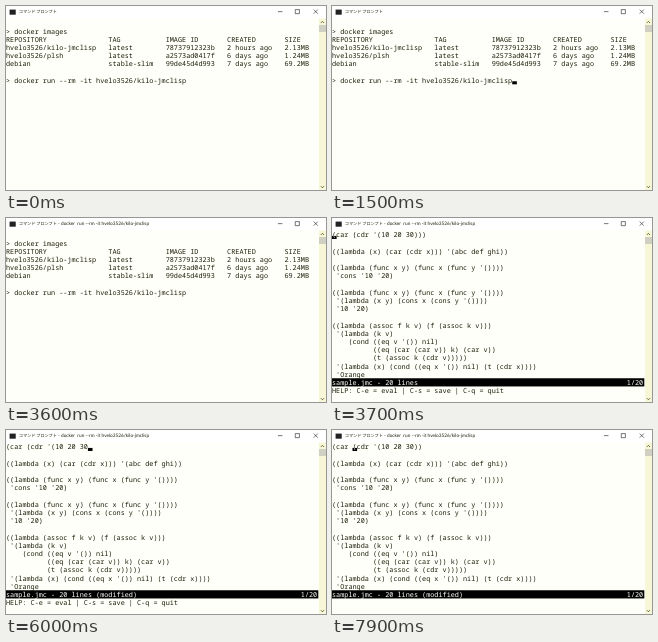
An HTML page for the animation above (8 s loop, 320 by 184 pixels).

```html
<!DOCTYPE html>
<html lang="ja">
<head>
<meta charset="utf-8">
<title>Console</title>
<style>
  :root { --paper: #fffffa; --ink: #1c1c08; }
  html, body { margin: 0; width: 100%; height: 100%; overflow: hidden; background: var(--paper); }
  /* Laid out at 625px wide with 8x16 cells, scaled to 320px. */
  #window {
    position: absolute; left: 0; top: 0; width: 625px; height: 360px; overflow: hidden;
    background: var(--paper); color: var(--ink);
    transform: scale(.512); transform-origin: 0 0;
    text-rendering: geometricPrecision;
  }
  #window > * { position: absolute; }
  #bar { left: 0; top: 0; width: 625px; height: 24px; background: #fff; }
  #icon { left: 7px; top: 7px; width: 12px; height: 10px; background: #222; }
  #title { left: 25px; top: 2px; white-space: pre; font: 9.2px/18px Lato, sans-serif; }
  #title b { font: 8.1px/18px "Noto Sans CJK JP", "Noto Sans CJK", sans-serif; }
  #buttons { left: 530px; top: 5px; fill: none; stroke: #222; stroke-width: 1.2; }
  #text {
    left: 0; top: 25.2px; width: 610px;
    font: 13.333px/16px "Noto Sans Mono", "DejaVu Sans Mono", monospace;
    font-variant-ligatures: none;
  }
  #text div { height: 16px; white-space: pre; }
  #text .status { background: #000; color: var(--paper); }
  #cursor { left: 0; top: 25.2px; width: 9px; height: 6px; background: var(--paper); mix-blend-mode: difference; }
  #scroll { left: 611px; top: 24px; fill: none; stroke: #55552a; stroke-width: 1.8; }
</style>
</head>
<body>
<div id="window">
  <div id="bar"></div>
  <div id="icon"></div>
  <div id="title"><b>コマンド プロンプト</b><span id="command"></span></div>
  <svg id="buttons" width="92" height="14">
    <path d="M1 6h9M35 2h8v8h-8zM71 2l8 8m0-8l-8 8"/>
  </svg>
  <div id="text"></div>
  <div id="cursor"></div>
  <svg id="scroll" width="14" height="336">
    <path d="M0 0h14v336h-14z" fill="#f7f7d8" stroke="none"/>
    <path d="M0 13h14v14h-14z" fill="#cfcfc2" stroke="none"/>
    <path d="M4 9l3-3 3 3M4 328l3 3 3-3"/>
  </svg>
</div>
<script>
const LOOP = 8000;
const $ = id => document.getElementById(id);
const user = 'hvelo3526';
const run = `run --rm -it ${user}/kilo-jmclisp`;

const row = (repo, tag, id, age, size) =>
  repo.padEnd(25) + tag.padEnd(14) + id.padEnd(15) + age.padEnd(14) + size;

const shell = [
  '',
  '> docker images',
  row('REPOSITORY', 'TAG', 'IMAGE ID', 'CREATED', 'SIZE'),
  row(`${user}/kilo-jmclisp`, 'latest', '78737912323b', '2 hours ago', '2.13MB'),
  row(`${user}/plsh`, 'latest', 'a2573ad0417f', '6 days ago', '1.24MB'),
  row('debian', 'stable-slim', '99de45d4d993', '7 days ago', '69.2MB'),
  '',
  `> docker ${run}`
];

const firstLine = "(car (cdr '(10 20 30)))";
const program = `
((lambda (x) (car (cdr x))) '(abc def ghi))

((lambda (func x y) (func x (func y '())))
 'cons '10 '20)

((lambda (func x y) (func x (func y '())))
 '(lambda (x y) (cons x (cons y '())))
 '10 '20)

((lambda (assoc f k v) (f (assoc k v)))
 '(lambda (k v)
    (cond ((eq v '()) nil)
          ((eq (car (car v)) k) (car v))
          (t (assoc k (cdr v)))))
 '(lambda (x) (cond ((eq x '()) nil) (t (cdr x))))
 'Orange`.split('\n');
const STATUS_ROW = 18;

function editor({ length, help }) {
  const modified = length < firstLine.length ? ' (modified)' : '';
  return [
    firstLine.slice(0, length),
    ...program,
    `sample.jmc - 20 lines${modified}`.padEnd(72) + '1/20',
    help ? 'HELP: C-e = eval | C-s = save | C-q = quit' : ''
  ];
}

// Each entry overrides the state before it; cursor is [column, row].
const events = [
  [0, { editing: false, titled: false, length: 23, help: true, cursor: null }],
  [500, { cursor: [44, 7] }],
  [1000, { cursor: null }],
  [1500, { cursor: [44, 7] }],
  [2100, { cursor: [0, 8] }],
  [2200, { titled: true }],
  [2600, { cursor: null }],
  [3100, { cursor: [0, 8] }],
  [3600, { cursor: null }],
  [3700, { editing: true, cursor: [0, 0] }],
  [4200, { cursor: null }],
  [4700, { cursor: [23, 0] }],
  [5200, { cursor: null }],
  [5500, { length: 22, cursor: [22, 0] }],
  [5700, { length: 21, cursor: [21, 0] }],
  [5900, { length: 20, cursor: [20, 0] }],
  [6300, { cursor: null }],
  // Typing a bracket briefly visits its partner.
  [6700, { length: 21, cursor: [11, 0] }],
  [6800, { cursor: [21, 0] }],
  [7100, { cursor: null }],
  [7200, { cursor: [21, 0] }],
  [7300, { cursor: null }],
  [7700, { length: 22, help: false }],
  [7900, { cursor: [5, 0] }]
];

const stateAt = t =>
  Object.assign({}, ...events.filter(([at]) => at <= t).map(([, change]) => change));

const lines = Array.from({ length: 20 }, () => $('text').appendChild(document.createElement('div')));

function setText(node, text) {
  if (node.textContent !== text) node.textContent = text;
}

function render(t) {
  const state = stateAt(t);
  const content = state.editing ? editor(state) : shell;
  lines.forEach((line, i) => setText(line, content[i] || ''));
  lines[STATUS_ROW].className = state.editing ? 'status' : '';
  setText($('command'), state.titled ? ` - docker  ${run}` : '');

  const cursor = $('cursor');
  cursor.hidden = !state.cursor;
  if (state.cursor) {
    const [column, line] = state.cursor;
    cursor.style.transform = `translate(${column * 8}px, ${line * 16 + 10}px)`;
  }
}

const start = performance.now();
function tick() {
  render((performance.now() - start) % LOOP);
  requestAnimationFrame(tick);
}
tick();
</script>
</body>
</html>
```
